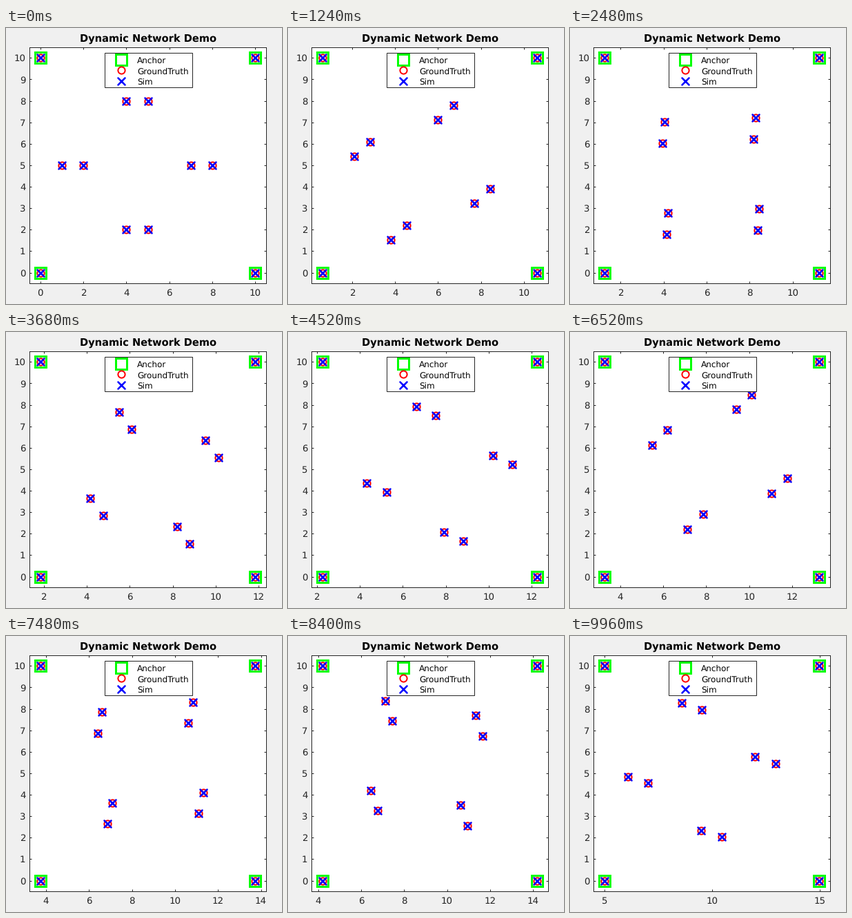
Write a matplotlib script that moves like this. It is 400x400 px and loops after 10 s.

```python
import math

import numpy as np
import matplotlib.pyplot as plt
from matplotlib.animation import FuncAnimation
from matplotlib.lines import Line2D
from matplotlib.markers import MarkerStyle
from matplotlib.patches import Rectangle
from matplotlib.transforms import Affine2D

SIZE, DPI = 400, 100
FRAMES, INTERVAL = 250, 40
PT = 72 / DPI                      # points per pixel
INK = "#262626"
DRIFT, SPIN, ORBIT = 0.02, -0.012, 0.024   # per frame
MARGIN = 0.5

plt.rcParams["font.family"] = "DejaVu Sans"
plt.rcParams["text.hinting"] = "none"
fig = plt.figure(figsize=(SIZE / DPI, SIZE / DPI), dpi=DPI, facecolor="#f0f0f0")

# Stage coordinates: pixels with the origin at the top left
stage = Affine2D().scale(1 / SIZE, -1 / SIZE).translate(0, 1) + fig.transFigure


def marker_style(shape, color, size, width):
    return dict(marker=shape, ls="none", mec=color, mfc="none",
                ms=size * PT, mew=width * PT)


STYLES = {
    "Anchor": marker_style("s", "#00ff00", 16, 3),
    "GroundTruth": marker_style("o", "#ff0000", 10.2, 2),
    "Sim": marker_style(MarkerStyle("x", capstyle="round"), "#0000ff", 10, 2.6),
}


def make_axes():
    left, right, top, bottom = 34.2, 377, 27.7, 370.2
    ax = fig.add_axes([left / SIZE, 1 - bottom / SIZE,
                       (right - left) / SIZE, (bottom - top) / SIZE])
    ax.set_ylim(-MARGIN, 10 + MARGIN)
    ax.set_yticks(range(11))
    ax.tick_params(direction="in", top=True, right=True, length=3.4 * PT,
                   width=PT, color=INK, labelcolor=INK, labelsize=13.33 * PT)
    ax.tick_params(axis="x", pad=8 * PT)
    ax.tick_params(axis="y", pad=5.7 * PT)
    for spine in ax.spines.values():
        spine.set(linewidth=PT, edgecolor=INK)
    return ax


def label(x, y, text, size, **kw):
    fig.text(x, y, text, transform=stage, fontsize=size * PT,
             va="baseline", zorder=7, **kw)


def draw_legend():
    fig.add_artist(Rectangle((143, 36), 127, 50, transform=stage, fc="white",
                             ec=INK, lw=PT, zorder=5))
    for i, (name, style) in enumerate(STYLES.items()):
        y = 46 + 15.4 * i
        fig.add_artist(Line2D([167], [y], transform=stage, zorder=6, **style))
        label(190, y + 5, name, 12, color="black")


def x_ticks(lo, hi):
    """Even ticks, or multiples of five when those span more of the axis."""
    def multiples(step):
        return np.arange(math.ceil(lo / step), math.floor(hi / step) + 1) * step

    twos, fives = multiples(2), multiples(5)
    return fives if np.ptp(fives) > np.ptp(twos) else twos


def network(frame):
    """Two crosses of four nodes; one circles the centre of the other."""
    center = 5 + DRIFT * frame + 5j
    arms = 3 * np.exp(1j * (np.arange(4) * np.pi / 2 + SPIN * frame))
    satellite = -np.exp(1j * ORBIT * frame)
    return np.concatenate([center + arms, center + satellite + arms])


ax = make_axes()
plots = {name: ax.plot([], [], zorder=3 + i, **style)[0]
         for i, (name, style) in enumerate(STYLES.items())}
label(206, 20, "Dynamic Network Demo", 14.67, ha="center",
      weight="bold", color="black")
draw_legend()


def update(frame):
    shift = DRIFT * frame
    lo, hi = shift - MARGIN, shift + 10 + MARGIN
    ticks = x_ticks(lo, hi)
    ax.set_xticks(ticks, [str(t) for t in ticks])
    ax.set_xlim(lo, hi)

    anchors = shift + np.array([0, 10, 10j, 10 + 10j])
    nodes = np.concatenate([anchors, network(frame)])
    plots["Anchor"].set_data(anchors.real, anchors.imag)
    for name in ("GroundTruth", "Sim"):
        plots[name].set_data(nodes.real, nodes.imag)
    return list(plots.values())


anim = FuncAnimation(fig, update, frames=FRAMES, interval=INTERVAL,
                     repeat=True, repeat_delay=0, blit=False)
plt.show()
```
